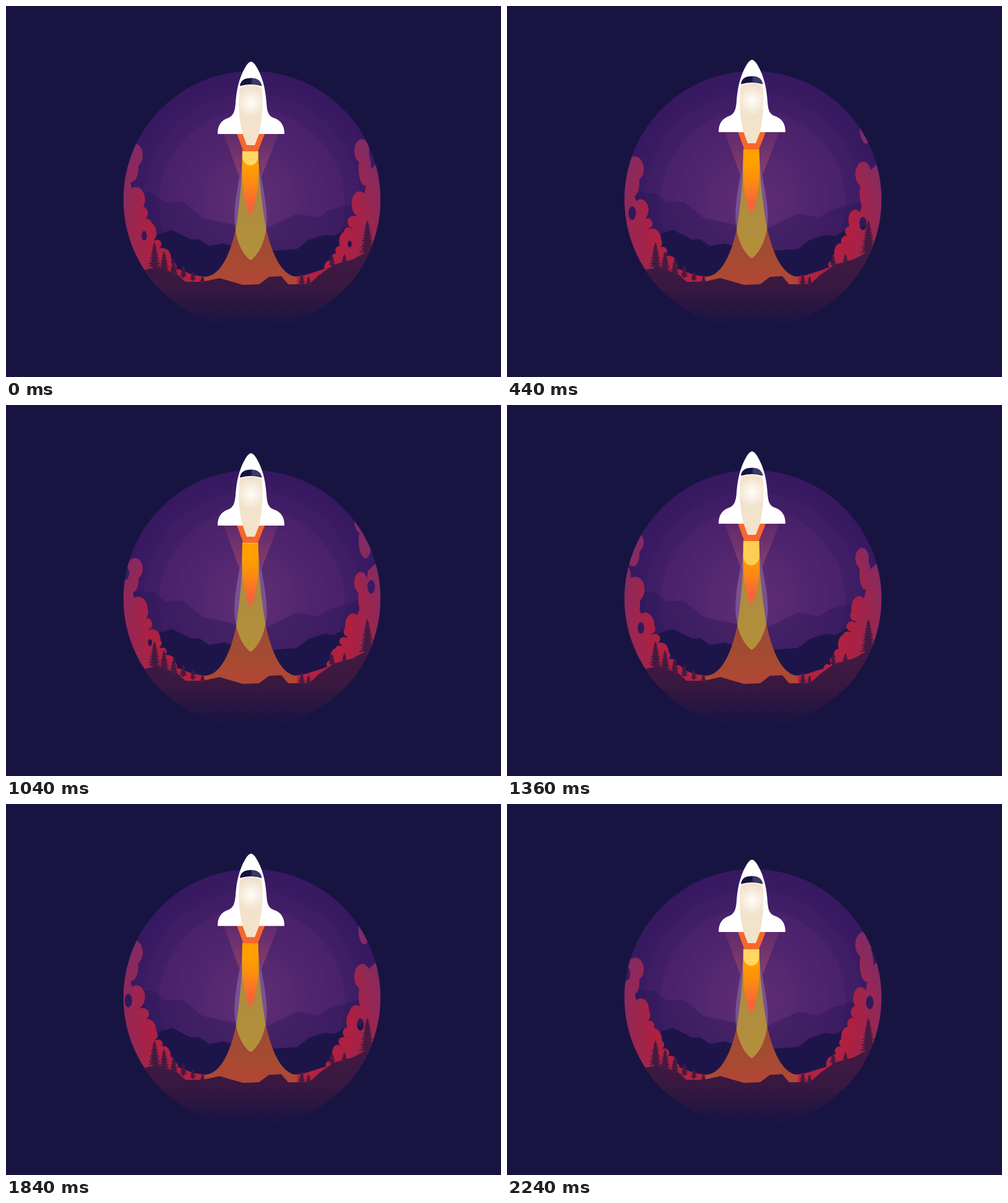
Animation of 800 by 600 pixels, one loop 2.28 s. Source, as an HTML page:

```html
<!DOCTYPE html>
<html lang="en">
<head>
<meta charset="utf-8">
<title>Lift-off</title>
<style>
html, body { margin: 0; width: 100%; height: 100%; overflow: hidden; background: #181442; }
svg { display: block; width: 100vw; height: 100vh; }
</style>
</head>
<body>
<svg viewBox="0 0 800 600">
  <defs>
    <clipPath id="globe"><circle cx="397.5" cy="313" r="207.7"/></clipPath>
    <clipPath id="plumeClip"><path id="plumeShape" d="M383 215C383 270 378 318 372 358C364 395 349 437 321 438V452H470V438C444 436 429 398 420 358C413 318 407 270 407 215Z"/></clipPath>
    <radialGradient id="sky" gradientUnits="userSpaceOnUse" cx="397" cy="318" r="208">
      <stop offset="0" stop-color="#5a2c6e"/><stop offset=".45" stop-color="#462069"/><stop offset="1" stop-color="#371961"/>
    </radialGradient>
    <radialGradient id="smokeFill" gradientUnits="userSpaceOnUse" cx="397" cy="360" r="235">
      <stop offset=".4" stop-color="#b62340"/><stop offset=".68" stop-color="#ae2042"/>
      <stop offset=".82" stop-color="#9a2650"/><stop offset="1" stop-color="#7c2c69"/>
    </radialGradient>
    <linearGradient id="ground" gradientUnits="userSpaceOnUse" x1="0" y1="385" x2="0" y2="518">
      <stop offset="0" stop-color="#441a42"/><stop offset=".5" stop-color="#391840"/><stop offset="1" stop-color="#181442"/>
    </linearGradient>
    <linearGradient id="plumeFill" gradientUnits="userSpaceOnUse" x1="0" y1="350" x2="0" y2="450">
      <stop offset="0" stop-color="#9c4938"/><stop offset=".6" stop-color="#a64b31"/><stop offset="1" stop-color="#b24636"/>
    </linearGradient>
    <linearGradient id="olive" x1="0" y1="0" x2="0" y2="1">
      <stop offset="0" stop-color="#a58a45"/><stop offset="1" stop-color="#b5903a"/>
    </linearGradient>
    <linearGradient id="flameFill" x1="0" y1="0" x2="0" y2="1">
      <stop offset=".25" stop-color="#ff9f00"/><stop offset=".5" stop-color="#fc8a12"/><stop offset=".85" stop-color="#f8633a"/>
    </linearGradient>
    <linearGradient id="beamFill" x1="0" y1="0" x2="0" y2="1">
      <stop offset="0" stop-color="#c8506a" stop-opacity=".16"/><stop offset="1" stop-color="#d06060" stop-opacity=".4"/>
    </linearGradient>
    <radialGradient id="belly" gradientUnits="userSpaceOnUse" cx="396" cy="156" r="44">
      <stop offset="0" stop-color="#fffdf9"/><stop offset=".55" stop-color="#f1e2cc"/><stop offset="1" stop-color="#f3e3cb"/>
    </radialGradient>
    <mask id="gaps" maskUnits="userSpaceOnUse" x="0" y="0" width="800" height="600">
      <path fill="#fff" d="M0 0H800V600H0Z"/><g id="holes"></g>
    </mask>
    <path id="haloShape" d="M383 235C380 275 367 318 369.5 350C371 378 382 402 395.5 411C409 402 420 378 421.5 350C423 318 410 275 407 235Z"/>
  </defs>

  <g clip-path="url(#globe)">
    <circle cx="397.5" cy="313" r="208" fill="url(#sky)"/>
    <g fill="#7a3b86">
      <circle cx="397.5" cy="315" r="175" opacity=".05"/>
      <circle cx="397.5" cy="318" r="150" opacity=".12"/>
      <circle cx="397.5" cy="318" r="124" opacity=".05"/>
    </g>
    <path fill="#251650" opacity=".36" d="M185 312L215 301L240 303L258 318L285 316L318 343L380 356L420 360L470 336L505 342L520 331L575 315L610 307V460H185Z"/>
    <path fill="#1d154a" d="M185 392L240 371L268 362L300 378L312 377L328 388L352 384L400 398L470 393L490 378L515 370L530 372L550 361L610 350V460H185Z"/>
    <g mask="url(#gaps)"><g id="smoke" fill="url(#smokeFill)"></g></g>
    <use href="#plumeShape" fill="url(#plumeFill)"/>
    <path fill="url(#ground)" d="M185 427L222 427L245 422L277 434L290 446L318 446L345 440L383 451L409 450L425 438L445 437L456 450L490 450L506 435L530 418L560 410L580 399L610 383V530H185Z"/>
    <g id="trees" fill="#441a40"></g>
  </g>

  <g class="lift">
    <path fill="url(#beamFill)" d="M352 207H376L383 235L377 276ZM440 207H416L407 235L413 276Z"/>
    <use href="#haloShape" fill="#a890c0" opacity=".38"/>
  </g>
  <g clip-path="url(#plumeClip)"><g class="lift"><use href="#haloShape" fill="url(#olive)"/></g></g>

  <g class="lift">
    <path fill="url(#flameFill)" d="M382 234H407.5C409 262 409 285 405 306C402 321 399 333 395 339C391 333 387 321 384.5 306C381 285 381 262 382 234Z"/>
    <path id="core" fill="#ffd765"/>
    <path fill="#f5672c" d="M373 206H418.5L407 235H383.5Z"/>
    <path fill="#fff" d="M396 90C391 90 385 101 380 113C374 128 372 144 371 157C370 171 367 178 359 181C347 185 342 194 342 207H450C450 194 445 185 433 181C424 178 422 171 421 157C420 144 418 128 412 113C407 101 401 90 396 90Z"/>
    <path fill="url(#belly)" d="M378 132Q395.5 124 413 132C417 158 413 187 409 207L402 225H389L382.5 207C377 187 374 158 378 132Z"/>
    <path fill="#15123f" d="M378 129.5C379 120 386 116.500 395.5 116.500C405 116.500 412 120 413.5 129.500Q395.5 124 378 129.500Z"/>
    <path fill="#48426f" opacity=".8" d="M397 116.600C405 117 412 120 413.5 129.500Q405 126.500 397 126.500Z"/>
  </g>
</svg>
<script>
const LOOP = 2280, STEP = 40, PEAK = 1520, RISE = 15.5, FLICKER = LOOP / 3;
const $ = id => document.getElementById(id);
const fixed = v => v.toFixed(1);
const ellipse = (x, y, rx, ry) =>
  `<ellipse cx="${fixed(x)}" cy="${fixed(y)}" rx="${fixed(rx)}" ry="${fixed(ry)}"/>`;
const polygon = pts => `<polygon points="${pts.map(p => p.map(fixed)).join(" ")}"/>`;
const range = n => [...Array(n).keys()];

// A smoke bank on each side; out points away from the rocket.
const sides = [
  { out: -1, edge: 221, bend: .0026, foot: 335, first: -1400, gap: 610, rx: 14, tail: 18 },
  { out: 1, edge: 563, bend: -.0022, foot: 452, first: -1450, gap: 730, rx: 12, tail: 28 }
];
const edgeX = (s, y) => s.edge + s.bend * Math.max(0, y - 275) ** 2;
const heightAt = age => 529 - 149 * Math.exp(.00047 * age);

function bank(s) {
  const rim = 397 + s.out * 240;
  const slope = range(14).map(i => {
    const y = 268 + i * 12;
    return [edgeX(s, y) + s.out * (3 + (440 - y) * .11), y];
  });
  return polygon([[397 + s.out * 205, 252], ...slope,
    [s.foot + s.out * 32, 435], [s.foot, 440], [s.foot, 462], [rim, 462], [rim, 252]]);
}

function puff(s, age, i) {
  if (age < -1150) return "";
  const size = Math.min(1, .4 + (age + 1150) / 2200) * (1 + .1 * Math.sin(i * 2.4));
  const y = heightAt(age), w = s.rx * size, h = 19 * size, tail = s.tail * size;
  const x = edgeX(s, y) + s.out * w;
  return ellipse(x, y, w, h) +
    ellipse(x + s.out * 5, y + (h + tail) * .6, w * .85, h * .5 + tail * .65);
}

// Small lumps that roll up the lower slope between the big puffs.
function lump(s, age, i) {
  const y = heightAt(age);
  if (y < 335 || y > 440) return "";
  const r = 5 + (440 - y) * .05 + Math.sin(i * 5.1);
  return ellipse(edgeX(s, y) + s.out * (r + 1), y, r, r);
}

function hole(s, age) {
  if (age < -100 || age > 1200) return "";
  const y = heightAt(age), size = Math.min(1, (age + 100) / 500);
  return ellipse(edgeX(s, y) + s.out * (20 + Math.min(8, age / 70)), y, 3 + 3 * size, 5 + 6 * size);
}

function spruce(x, base, height) {
  const tiers = Math.max(5, Math.round(height / 5)), half = 3 + height * .2;
  const branch = side => range(tiers).flatMap(i => {
    const f = (i + 1) / tiers, y = base - height * (1 - f * .92);
    const w = half * f ** .75 * (i % 2 ? 1 : .82);
    return [[x + side * w, y], [x + side * w * .4, y - 1.2]];
  });
  return polygon([[x, base - height], ...branch(-1), [x - 1, base], [x + 1, base], ...branch(1).reverse()]);
}
const row = (n, x, dx, base, dy, height, shrink) =>
  range(n).map(i => spruce(x + i * dx, base + i * dy, height * shrink ** i)).join("");

$("trees").innerHTML = row(6, 240, 15.5, 426, 4.6, 44, .78) + row(1, 584, 0, 404, 0, 58, 1) +
  row(2, 547, -20, 418, 3, 17, 1.1) + row(2, 489, -11, 452, 0, 15, 1.3);

// The core bursts out quickly, then shrinks back.
function coreLength(t) {
  const q = (t / FLICKER + .42) % 1;
  return 41 * (q < .19 ? q / .19 : Math.max(0, 1 - (q - .19) / .63) ** 1.3);
}

const ease = p => (1 - Math.cos(Math.PI * p)) / 2;
const lifts = document.querySelectorAll(".lift");
const banks = sides.map(bank).join("");

function draw(t) {
  const up = RISE * (t < PEAK ? ease(t / PEAK) : 1 - ease((t - PEAK) / (LOOP - PEAK)));
  lifts.forEach(g => g.setAttribute("transform", `translate(0 ${-up.toFixed(2)})`));

  const len = coreLength(t), cap = Math.min(15, len), side = 235 + len - cap;
  $("core").setAttribute("d", len < .5 ? "" :
    `M382 235H407.5V${side}A12.75 ${cap} 0 0 1 382 ${side}Z`);
  $("core").setAttribute("opacity", Math.min(1, 1.4 - len / 70));

  $("smoke").innerHTML = banks + sides.map(s =>
    range(8).map(i => puff(s, t - s.first - i * s.gap, i)).join("") +
    range(24).map(i => lump(s, t - s.first - i * 210, i)).join("")).join("");
  $("holes").innerHTML = sides.map(s =>
    range(3).map(i => hole(s, t - s.first - 60 - 2 * i * s.gap)).join("")).join("");
}

const began = performance.now();
function tick() {
  const t = (performance.now() - began) % LOOP;
  draw(Math.floor(t / STEP) * STEP);
  requestAnimationFrame(tick);
}
tick();
</script>
</body>
</html>
```
